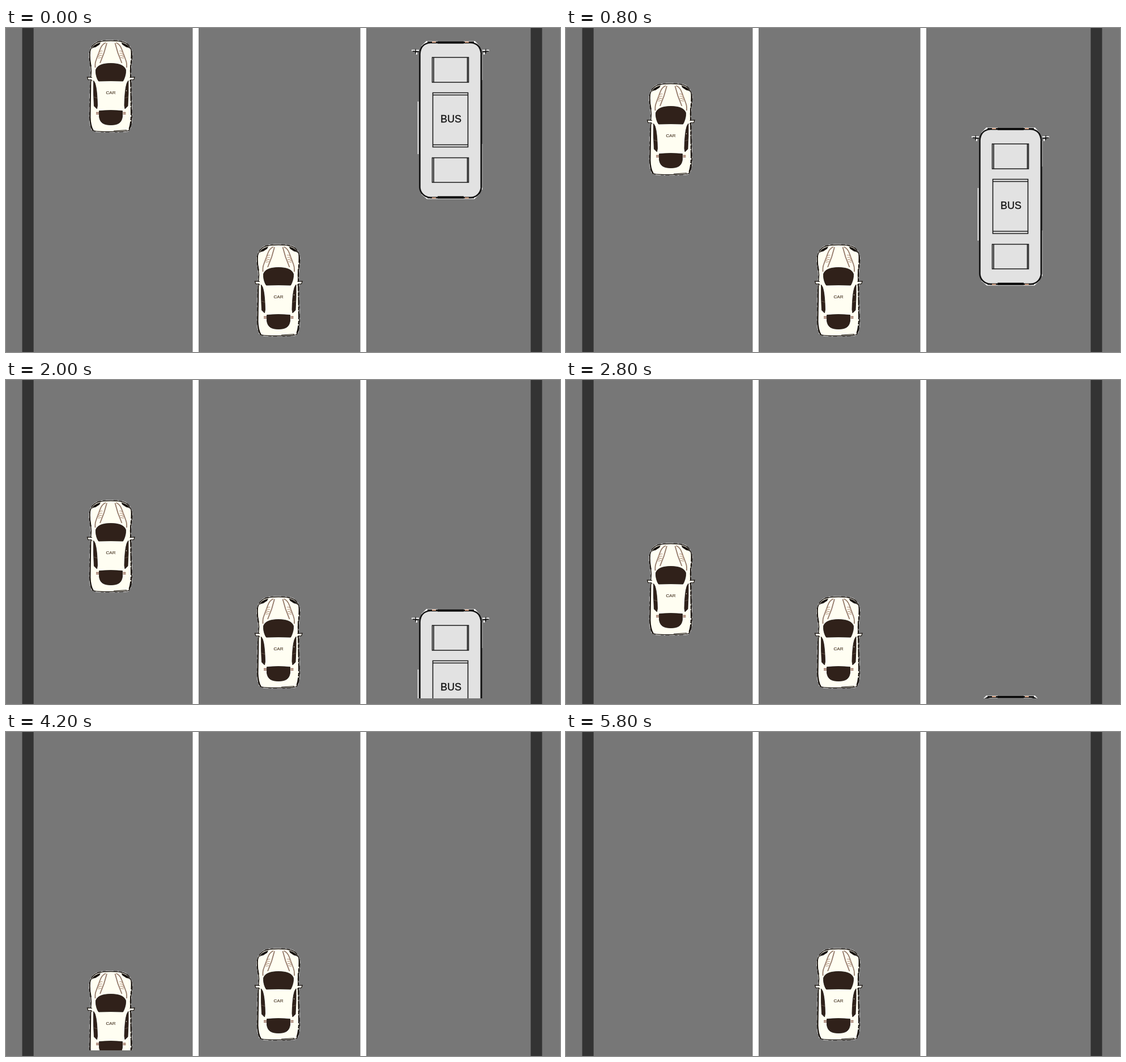
Animation, 978 px wide and 573 px high, one loop 6000 ms. Source, as an HTML page:

```html
<!DOCTYPE html>
<html lang="en">
<head>
<meta charset="utf-8">
<title>Three lanes</title>
<style>
  /* Integer properties keep every step on whole pixels. */
  @property --car { syntax: "<integer>"; inherits: false; initial-value: 0; }
  @property --bus { syntax: "<integer>"; inherits: false; initial-value: 0; }

  html, body { margin: 0; width: 100%; height: 100%; overflow: hidden; background: #777; }
  svg { display: block; width: 978px; height: 573px; }
  text { font-family: "Liberation Sans", Arial, sans-serif; text-anchor: middle; }

  .car { animation: car 6s steps(30) infinite; transform: translateY(calc(var(--car) * 1px)); }
  .bus { animation: bus 6s steps(30) infinite; transform: translateY(calc(var(--bus) * 1px)); }
  @keyframes car { from { --car: 0; } to { --car: 573; } }
  @keyframes bus { from { --bus: 0; } to { --bus: 1146; } }

  .line { fill: none; stroke: #17110d; }
  .glass { fill: #30211a; stroke: #17110d; stroke-width: .8; }
  .trim { fill: none; stroke: #93796a; stroke-width: 1.8; }
  .vent { fill: none; stroke: #b99b88; stroke-width: 1.1; }
  .frame { fill: none; stroke: #1a1a1a; stroke-width: 1.6; }
</style>
</head>
<body>
<svg viewBox="0 0 978 573">
  <defs>
    <clipPath id="view"><rect width="978" height="563"/></clipPath>

    <path id="shell" d="M185 22.500C176 22.500 168 23 162 25C153 28 148 37 147.500 48C147.500 58 150 67 150.500 76L149.500 90L148.500 125L148 158C148 168 150 176 153 181Q157 183.500 185 183.500T217 181C220 176 222 168 222 158L221 125L220.500 90L219.500 76C220 67 222.500 58 222.500 48C222 37 217 28 208 25C202 23 194 22.500 185 22.500Z"/>

    <g id="half">
      <path d="M151 37Q155 28 167 25.500L165 29.500L158 34Q154 34 151 37Z" fill="#17110d"/>
      <path class="trim" d="M176 26Q169 29 166 38L159 57Q157 62 157.500 70M178 26.500L173 44L166 62"/>
      <path class="vent" d="M163 46Q166 39 170.500 41M162.500 49Q166 43 170 45M162.500 51.500Q166 47 169.500 49M162.500 53.500L168.500 52"/>
      <path class="glass" d="M154.500 93Q157.500 96 159 105Q161 116 161.500 137L160.500 143L155.500 138Q154 116 154.500 93Z"/>
      <path d="M155 122L161 124" stroke="#77675a" stroke-width=".7"/>
      <path d="M152 94L150.500 91.500L145 91.500L143.500 87L152 87.500" fill="#fffef2" stroke="#17110d" stroke-width="1.200"/>
      <path d="M159 149.500H164M159 152H164" stroke="#8b5c4c" stroke-width="1.600"/>
    </g>

    <g id="car">
      <use href="#shell" fill="none" stroke="#fff" stroke-width="2.600" stroke-dasharray="9 5 3 7"/>
      <use href="#shell" fill="#fffef2" stroke="#17110d" stroke-width="1.400"/>
      <path class="line" stroke-width="1.800" d="M148 42Q147 54 150 68M149.500 94L148.500 158Q149 174 154 181"/>
      <path class="line" stroke-width="2" stroke-dasharray="14 3 6 2" d="M221.500 40Q222 54 220 68V88L221 150Q221 170 217 180"/>
      <path class="line" d="M190 182L213 180.500"/>
      <use href="#half"/>
      <use href="#half" transform="matrix(-1 0 0 1 370.500 0)"/>
      <path class="glass" d="M158.500 74C161 66 171 62.500 185 62.500S209 66 211.500 74C212 81 209.500 89 206.500 94Q185 93 163.500 94C160 89 158 81 158.500 74Z"/>
      <path class="glass" d="M164.500 146.500Q185 144.500 205.500 146.500V157C204 168 197 171.500 185 171.500S166 168 164.500 157Z"/>
      <circle cx="212.500" cy="111" r=".8" fill="#fffef2"/>
      <text x="185" y="117" font-size="8" fill="#51402f" stroke="#51402f" stroke-width=".2">CAR</text>
    </g>

    <path id="hull" d="M749 26H821C832 27 838 34 839 46V282C838 292 831 299 821 300H749C739 299 731 292 730.500 282V46C731 34 738 27 749 26Z"/>

    <g id="bus">
      <path d="M742 23H828L836 32H733ZM733 294H836L827 302.500H743Z" fill="#fff"/>
      <path d="M727.500 130V223" stroke="#fff" stroke-width="1.500"/>
      <path d="M840.700 46V92M840.700 205V286" stroke="#fff"/>
      <use href="#hull" fill="#e2e2e2" stroke="#111" stroke-width="2.600"/>
      <path d="M839 46V282" stroke="#111" stroke-width="2.600"/>
      <path d="M744 25H826M744 300H826" stroke="#111" stroke-width="2.500"/>
      <path d="M762 25.500H808M762 299.500H808" stroke="#050505" stroke-width="4"/>
      <path d="M752 25H759M810 25H817M752 300.500H759M810 300.500H817" stroke="#d9a384" stroke-width="2"/>
      <path d="M716 39.500H729M841 39.500H853M725 43V47M844 43V47" stroke="#fff" stroke-width="2"/>
      <path d="M718 41L729 42M852 41L841 42M723 37V45M847 37V45" stroke="#111" stroke-width="1.300"/>
      <path class="frame" d="M752.500 52H816.500V96H752.500ZM755 52V96M814.500 52V96"/>
      <path class="frame" d="M753.500 114.500H815.500V210.500H753.500ZM753.500 118.500H815.500M753.500 206.500H815.500"/>
      <path class="frame" d="M752.500 229.500H816.500V273H752.500ZM755 229.500V273M814.500 229.500V273"/>
      <text x="785.500" y="167" font-size="18" fill="#111" stroke="#111" stroke-width=".3">BUS</text>
    </g>
  </defs>

  <rect width="978" height="573" fill="#777"/>
  <path d="M28.600 0H48.700V573H28.600ZM926.300 0H946.400V573H926.300Z" fill="#333"/>
  <path d="M329.600 0H340V573H329.600ZM625.600 0H636V573H625.600Z" fill="#fff"/>
  <use href="#car" x="296" y="361"/>
  <g clip-path="url(#view)">
    <g class="car"><use href="#car"/></g>
    <g class="bus"><use href="#bus"/></g>
  </g>
</svg>
</body>
</html>
```
